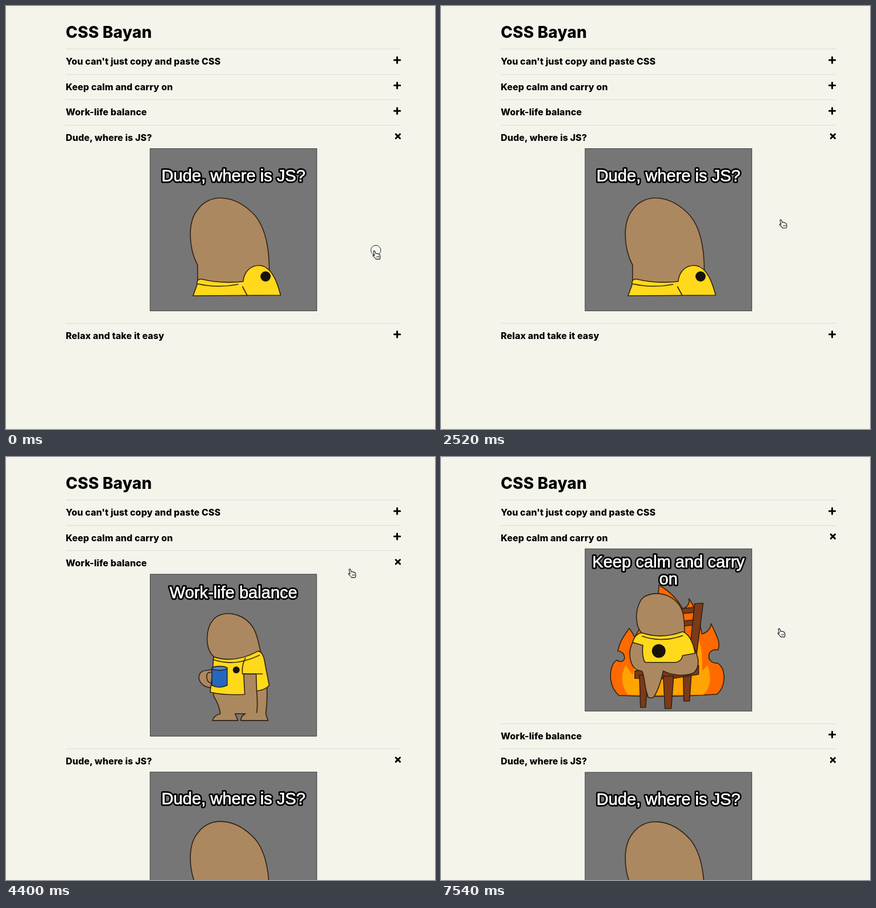
Animation, 754 px wide and 743 px high, one loop 8 s. Source, as an HTML page:

```html
<!DOCTYPE html>
<html lang="en">
<head>
<meta charset="utf-8">
<title>CSS Bayan</title>
<style>
  html, body { margin: 0; width: 100%; height: 100%; overflow: hidden; background: #f5f4eb; }
  svg { display: block; }
  .title { font: 800 16px Inter, "Open Sans", sans-serif; letter-spacing: .12px; }
  .heading { font: 800 28px Inter, "Open Sans", sans-serif; letter-spacing: .2px; }
  .caption {
    font: 29.2px "Liberation Sans", Arial, sans-serif; text-anchor: middle;
    fill: #fff; stroke: #fff; stroke-width: .7; stroke-linejoin: round;
  }
  .edge { stroke: #000; stroke-width: 6; }
  .ink { stroke: #33210f; stroke-width: 1.6; stroke-linejoin: round; stroke-linecap: round; }
  .body { fill: #ab8860; }
  .shirt { fill: #ffd91a; }
  .wood { fill: #7c3a18; }
  .crease { fill: none; }
  .icon { fill: none; stroke: #000; stroke-width: 3; stroke-linecap: round; }
</style>
</head>
<body>
<svg id="stage" width="754" height="743" viewBox="0 0 754 743">
  <text class="heading" x="105" y="56">CSS Bayan</text>
  <g id="list"></g>
  <g id="cursor">
    <circle id="halo" cx="-1" cy="-8" r="8.7" fill="#fafaf4" stroke="#222"/>
    <path d="M-5.2-6.2Q-4-8-2.6-6.2L-1-2Q.2-3 1.2-1.9Q2.6-2.6 3.4-1.3Q5.2-1.7 6-.1L6.8 4Q6.8 5.5 5.8 7.6H-.8Q-1.6 5.6-5.4 2.6Q-6.8 .8-5.2 .4L-3.2 1.4Z"
      fill="#fff" stroke="#111" stroke-width="1.1" stroke-linejoin="round"/>
    <path d="M.6 2.2l.4 3M2.6 2l.3 3M4.5 1.8l.2 3" stroke="#111" stroke-width=".8"/>
  </g>
</svg>
<script>
const LEFT = 105, RIGHT = 694, TOP = 75, ROW = 44.6, EXTRA = 303.4;
const PIC_W = 294, PIC_H = 286, MID = 399.7, LOOP = 8000, DURATION = 400;

const shape = (cls, d) => `<path class="ink ${cls}" d="${d}"/>`;
const badge = (x, y, r) => `<circle cx="${x}" cy="${y}" r="${r}" fill="#17130c"/>`;
const caption = (y, ...lines) => ["caption edge", "caption"].map(cls => lines.map((line, i) =>
  `<text class="${cls}" x="147" y="${y + i * 29.5}">${line}</text>`).join("")).join("");

const calmArt =
  `<path class="ink" fill="#ff6a00" d="M60 258C40 240 42 205 56 196C72 206 76 182 58 180C62 160 72 150 78 140
    Q84 148 88 156C98 130 132 110 130 64C150 75 165 92 172 106Q186 100 183 88C196 105 202 130 206 150
    Q220 146 222 132C230 150 240 165 234 178C214 174 212 202 232 201C246 205 252 240 232 256Q145 262 60 258Z"/>
  <path fill="#ffa400" d="M76 257C60 235 66 215 72 205L84 222C90 200 90 180 100 160H200Q208 180 206 215L216 205
    C224 230 220 245 208 257Z"/>` +
  shape("wood", "M164 106L196 103V112L164 115ZM166 128L194 125V134L166 137Z") +
  shape("wood", "M193 97L208 96L194 205H182Z") +
  shape("wood", "M173 211H188L184 268H174Z") +
  shape("wood", "M88 215L200 205V221L150 229L88 228Z") +
  shape("wood", "M96 222H111L107 279H98ZM138 224H156L152 281H141Z") +
  shape("body", `M112 262C104 245 106 222 100 215C80 215 74 185 84 165C88 160 98 155 102 150C84 135 90 95 104 85
    C130 70 165 85 172 112C178 135 172 148 180 160C200 180 205 205 192 218C175 226 150 222 138 215Q130 250 120 262Z`) +
  shape("shirt", `M100 148Q135 160 172 146Q188 152 194 184L172 188Q170 198 160 200H106Q100 190 102 170L84 165
    Q88 150 100 148Z`) +
  shape("crease", "M101 154Q135 166 172 153") +
  badge(130, 180, 12) +
  caption(33.5, "Keep calm and carry", "on");

const balanceArt =
  shape("body", `M110 258Q112 249 124 246Q122 230 112 215V200C84 202 78 172 98 170L112 168V145
    C96 130 98 95 112 80C128 62 165 68 182 95C194 115 192 140 200 150Q210 200 204 246L208 258H160
    Q160 250 168 246H150L155 258Z`) +
  shape("shirt", `M112 146Q150 158 190 136Q200 136 203 160L210 196Q204 204 188 206L187 176H165L167 212
    Q130 214 106 208Q110 180 112 146Z`) +
  shape("crease", "M112 151Q150 164 193 143M168 148Q161 162 163 176H198M188 206Q190 232 188 244") +
  `<path class="ink crease" d="M109 173Q99 172 100 182T109 192"/>
  <path class="ink" fill="#2468bd" d="M109 166V196Q122 203 136 196V166Z"/>
  <ellipse class="ink" fill="#4a8ad4" cx="122.5" cy="166" rx="13.5" ry="3.5"/>` +
  badge(152, 169, 6) +
  caption(42.5, "Work-life balance");

const dudeArt =
  shape("body", `M84 240V205C68 175 66 130 84 108C105 78 150 80 185 118C205 142 210 180 210 215L205 245Z`) +
  shape("shirt", `M76 259L83 240Q82 228 92 230Q125 238 164 234C166 214 180 204 196 206C215 210 224 235 230 258Z`) +
  shape("crease", "M84 238Q120 246 155 239M163 243l8 15") +
  badge(203.5, 225, 9) +
  caption(57.5, "Dude, where is JS?");

const relaxArt =
  `<ellipse class="ink" fill="#5b93d6" cx="178" cy="166" rx="78" ry="84"/>` +
  shape("body", `M72 170C76 130 100 125 132 142L140 138C136 110 144 92 160 84C188 76 212 100 206 140L212 250H80Z`) +
  shape("shirt", "M130 143L144 133Q175 150 206 134L216 142V230H126Z") +
  badge(139, 153, 7) +
  caption(33.5, "Relax and take it", "easy");

// toggles: times at which an item opens, closes, opens again
const items = [
  { title: "You can't just copy and paste CSS", art: "", toggles: [] },
  { title: "Keep calm and carry on", art: calmArt, toggles: [5504] },
  { title: "Work-life balance", art: balanceArt, toggles: [4030, 5395] },
  { title: "Dude, where is JS?", art: dudeArt, toggles: [-DURATION] },
  { title: "Relax and take it easy", art: relaxArt, toggles: [560, 1600] }
];

// bursts of movement: start, end, number of steps
const bursts = [
  [150, 1170, 8], [1320, 2070, 6], [2370, 3410, 8],
  [3550, 4550, 8], [5150, 6050, 7], [6650, 7540, 7]
];

// pointer path: time, x, y
const path = [
  [0, 651, 437], [560, 592, 577], [878, 589, 612.5], [1170, 592, 600], [1600, 593, 577],
  [2070, 612, 437], [2518, 601, 382.5], [2900, 597, 330], [3410, 604, 255], [3978, 603, 218.5],
  [4121, 606, 184], [4407, 608, 204], [5150, 608, 200], [5395, 607, 187], [5600, 606, 139],
  [5750, 606, 160.5], [6050, 607, 155], [6500, 607, 155], [7540, 598, 308.5]
];

const list = document.getElementById("list");
const cursor = document.getElementById("cursor");
const halo = document.getElementById("halo");

list.innerHTML = items.map(({ title, art }) => `<g>
  <rect class="rule" x="${LEFT}" width="${RIGHT - LEFT}" height="1" fill="#d9dbdc"/>
  <text class="title" x="${LEFT}" y="28">${title}</text>
  <path class="icon" d="M-5.2 0H5.2M0-5.2V5.2"/>
  <g class="picture">${art && `<rect x=".5" y=".5" width="${PIC_W - 1}" height="${PIC_H - 1}" fill="#767676" stroke="#3c3c3c"/>${art}`}</g>
</g>`).join("");

items.forEach((item, i) => {
  item.row = list.children[i];
  item.rule = item.row.querySelector(".rule");
  item.icon = item.row.querySelector(".icon");
  item.picture = item.row.querySelector(".picture");
});

const clamp = v => Math.min(1, Math.max(0, v));
const bezier = (u, a, b) => 3 * u * (1 - u) ** 2 * a + 3 * u * u * (1 - u) * b + u ** 3;

// the CSS "ease" curve
function ease(x) {
  if (x <= 0 || x >= 1) return clamp(x);
  let low = 0, high = 1;
  for (let i = 0; i < 24; i++) {
    const u = (low + high) / 2;
    if (bezier(u, .25, .25) < x) low = u; else high = u;
  }
  return bezier(low, .1, 1);
}

const openness = (toggles, t) => toggles.reduce((sum, start, i) =>
  sum + (i % 2 ? -1 : 1) * ease((t - start) / DURATION), 0);

function snap(t) {
  const burst = bursts.filter(b => b[0] <= t).pop();
  if (!burst) return 0;
  const [start, end, steps] = burst;
  const gap = (end - start) / (steps - 1);
  return start + gap * Math.min(steps - 1, Math.floor((t - start) / gap + .15));
}

function pointer(t) {
  const i = path.findIndex(p => p[0] > t);
  if (i < 0) return path[path.length - 1].slice(1);
  const [t0, x0, y0] = path[i - 1], [t1, x1, y1] = path[i];
  const k = (t - t0) / (t1 - t0);
  return [x0 + (x1 - x0) * k, y0 + (y1 - y0) * k];
}

function render(now) {
  const t = snap(now);
  let y = TOP;
  for (const { row, rule, icon, picture, toggles } of items) {
    const s = clamp(openness(toggles, t));
    row.setAttribute("transform", `translate(0 ${y})`);
    rule.setAttribute("y", Math.round(y) - y); // keeps the hairline crisp
    icon.setAttribute("transform", `translate(${687.5 + 1.3 * s} 20) rotate(${45 * s})`);
    picture.setAttribute("transform", `translate(${MID - PIC_W / 2 * s} ${34 + 7.2 * s}) scale(${s})`);
    picture.setAttribute("opacity", s);
    picture.setAttribute("visibility", s > .001 ? "visible" : "hidden");
    y += ROW + EXTRA * s;
  }
  const [px, py] = pointer(t);
  cursor.setAttribute("transform", `translate(${px} ${py})`);
  halo.setAttribute("visibility", t < 150 ? "visible" : "hidden");
}

const begin = performance.now();
function tick() {
  render((performance.now() - begin) % LOOP);
  requestAnimationFrame(tick);
}
tick();
</script>
</body>
</html>
```
